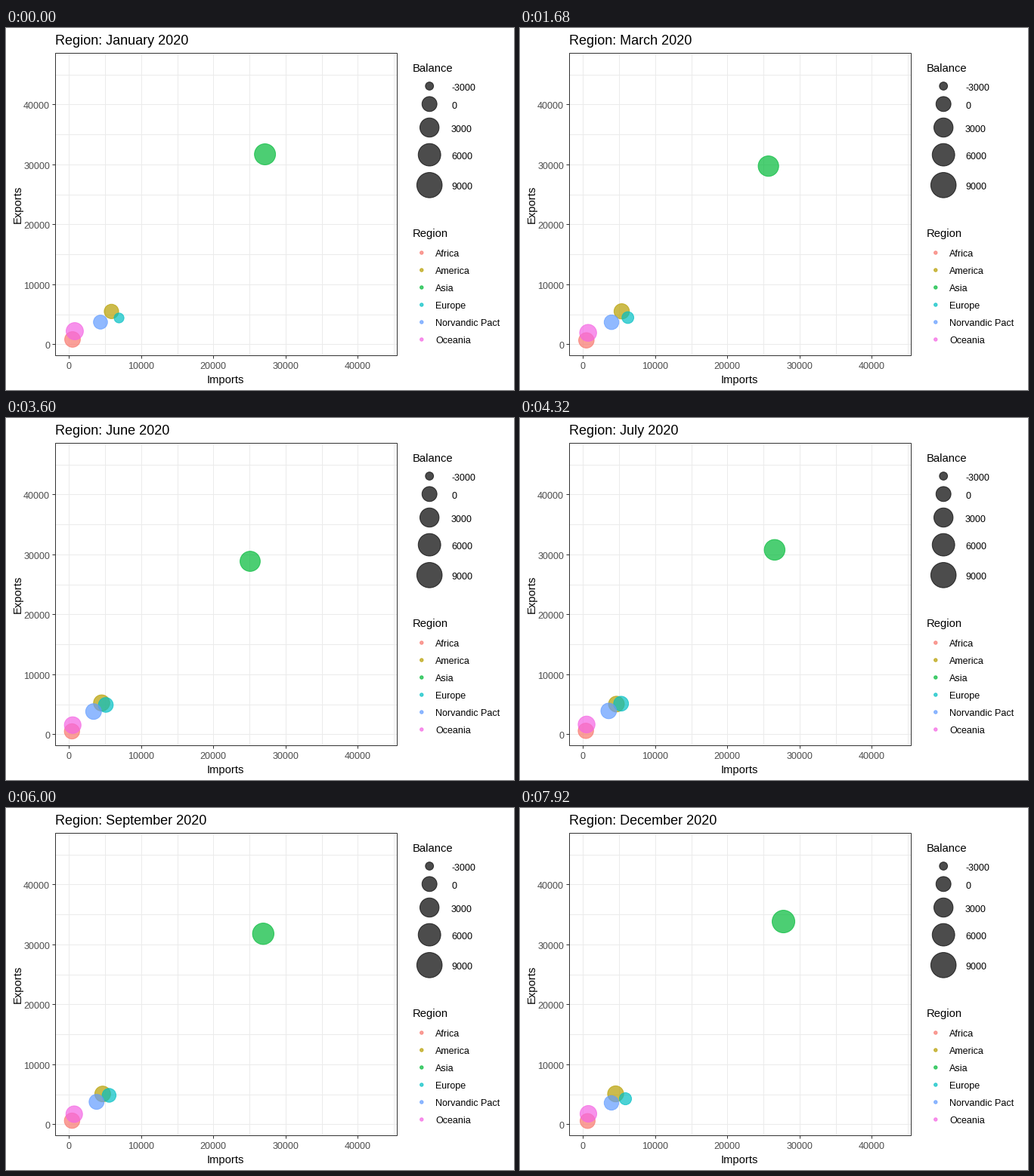
Animation of 672 by 480 pixels, one loop 8 s. Source, as a matplotlib script:

```python
import matplotlib.pyplot as plt
import numpy as np
from matplotlib.animation import FuncAnimation
from matplotlib.patches import Circle, Rectangle

W, H, DPI = 672, 480, 96
LEFT, TOP, RIGHT, BOTTOM = 65.5, 33.5, 517.5, 434.5
INTERVAL, FRAMES, HOLD = 80, 100, 3      # a new pose every third tick
DAYS_PER_STEP = 1065 / 99

MONTHS = ("January February March April May June July August "
          "September October November December").split()

# Steps of the start, spring slump, summer, autumn slump and close.
TURNS = [0, 12, 22, 28, 33]

# name, colour, (imports, exports) in thousands at each turn
REGIONS = [
    ("Africa", "#F8766D",
     [(.45, .86), (.4, .41), (.35, .67), (.5, .6), (.6, .6)]),
    ("America", "#B79F00",
     [(5.84, 5.53), (4.32, 5.57), (4.64, 5.0), (4.58, 5.45), (4.48, 5.13)]),
    ("Asia", "#00BA38",
     [(27.1, 31.74), (22.8, 25.95), (27.2, 31.74), (25.83, 32.1),
      (27.72, 33.87)]),
    ("Europe", "#00BFC4",
     [(6.89, 4.44), (4.79, 4.63), (5.32, 5.26), (6.1, 3.75), (5.84, 4.31)]),
    ("Norvandic Pact", "#619CFF",
     [(4.32, 3.75), (3.12, 3.69), (3.6, 4.0), (4.32, 3.18), (3.9, 3.62)]),
    ("Oceania", "#F564E3",
     [(.76, 2.24), (.5, 1.42), (.45, 1.74), (1.39, 1.74), (.71, 1.8)]),
]

plt.rcParams["font.family"] = "Liberation Sans"
fig = plt.figure(figsize=(W / DPI, H / DPI), dpi=DPI, facecolor="white")
ax = fig.add_axes([0, 0, 1, 1])
ax.set_xlim(0, W)
ax.set_ylim(H, 0)
ax.axis("off")


def px(imports):
    return 83.7 + 9.554 * imports


def py(exports):
    return 419.8 - 7.95 * exports


def radius(balance):
    """Point radius in pixels, its area growing with the balance."""
    share = np.clip((balance + 3.7) / 14, 0, 1)
    size = 1 + 11 * np.sqrt(share)
    return (size * 2.845 + 0.94) / 2


def line(xs, ys, color, z):
    ax.plot(xs, ys, color=color, lw=0.75, zorder=z, snap=False,
            solid_capstyle="butt")


def label(x, y, text, size, color="black", ha="left", **kw):
    return ax.text(x, y, text, fontsize=size * 0.75, color=color,
                   ha=ha, va="baseline", **kw)


def dot(x, y, r, color, z=3):
    c = Circle((x, y), r, facecolor=color, edgecolor=color, alpha=0.7,
               lw=0.75, zorder=z)
    return ax.add_patch(c)


def mid_pixel(v):
    return np.floor(v) + 0.5


def draw_panel():
    for v in range(0, 46, 5):
        x, y = mid_pixel(px(v)), mid_pixel(py(v))
        line([x, x], [TOP, BOTTOM], "#EBEBEB", 1)
        line([LEFT, RIGHT], [y, y], "#EBEBEB", 1)
        if v % 10 == 0:
            text = str(v * 1000)
            line([x, x], [BOTTOM, BOTTOM + 4], "#333333", 2)
            line([LEFT - 4, LEFT], [y, y], "#333333", 2)
            label(px(v) - 0.7, 452.5, text, 12.5, "#4D4D4D", "center")
            label(58, y + 5.5, text, 12.5, "#4D4D4D", "right")
    ax.add_patch(Rectangle((LEFT, TOP), RIGHT - LEFT, BOTTOM - TOP,
                           fill=False, edgecolor="#333333", lw=0.75,
                           zorder=6, snap=False))
    label(290.5, 471, "Imports", 14.7, ha="center")
    label(20, 233.5, "Exports", 14.7, ha="center", rotation=90,
          rotation_mode="anchor")


def draw_legend():
    label(538, 58, "Balance", 14.7)
    y = 77
    for value in range(-3, 10, 3):
        r = radius(value)
        dot(560.2, y, r, "black")
        label(589, y + 6, str(value * 1000), 12.5)
        y += r + radius(value + 3) + 8.5    # keys grow with their points
    label(538, 277, "Region", 14.7)
    for i, (name, color, _) in enumerate(REGIONS):
        y = 298 + 23 * i
        dot(549.8, y, 2.2, color)
        label(568, y + 5, name, 12.5)


def trade(path, step):
    """Slumps gather speed, recoveries slow down."""
    leg = min(np.searchsorted(TURNS, step, side="right") - 1, len(TURNS) - 2)
    t = (step - TURNS[leg]) / (TURNS[leg + 1] - TURNS[leg])
    ease = t ** 2 if leg % 2 == 0 else 1 - (1 - t) ** 2
    start, end = np.array(path[leg]), np.array(path[leg + 1])
    return start + (end - start) * ease


draw_panel()
draw_legend()
title = label(65, 22, "", 18)
bubbles = [dot(0, 0, 1, color, 4) for _, color, _ in REGIONS]


def update(tick):
    step = tick // HOLD
    day = np.datetime64("2020-01-01") + int(step * DAYS_PER_STEP)
    month = day.astype("datetime64[M]").astype(int) % 12
    title.set_text(f"Region: {MONTHS[month]} 2020")
    for bubble, (_, _, path) in zip(bubbles, REGIONS):
        imports, exports = trade(path, step)
        bubble.center = px(imports), py(exports)
        bubble.set_radius(radius(exports - imports))
    return [title, *bubbles]


anim = FuncAnimation(fig, update, frames=FRAMES, interval=INTERVAL,
                     init_func=lambda: update(0), repeat=True,
                     repeat_delay=0, blit=False)
plt.show()
```
